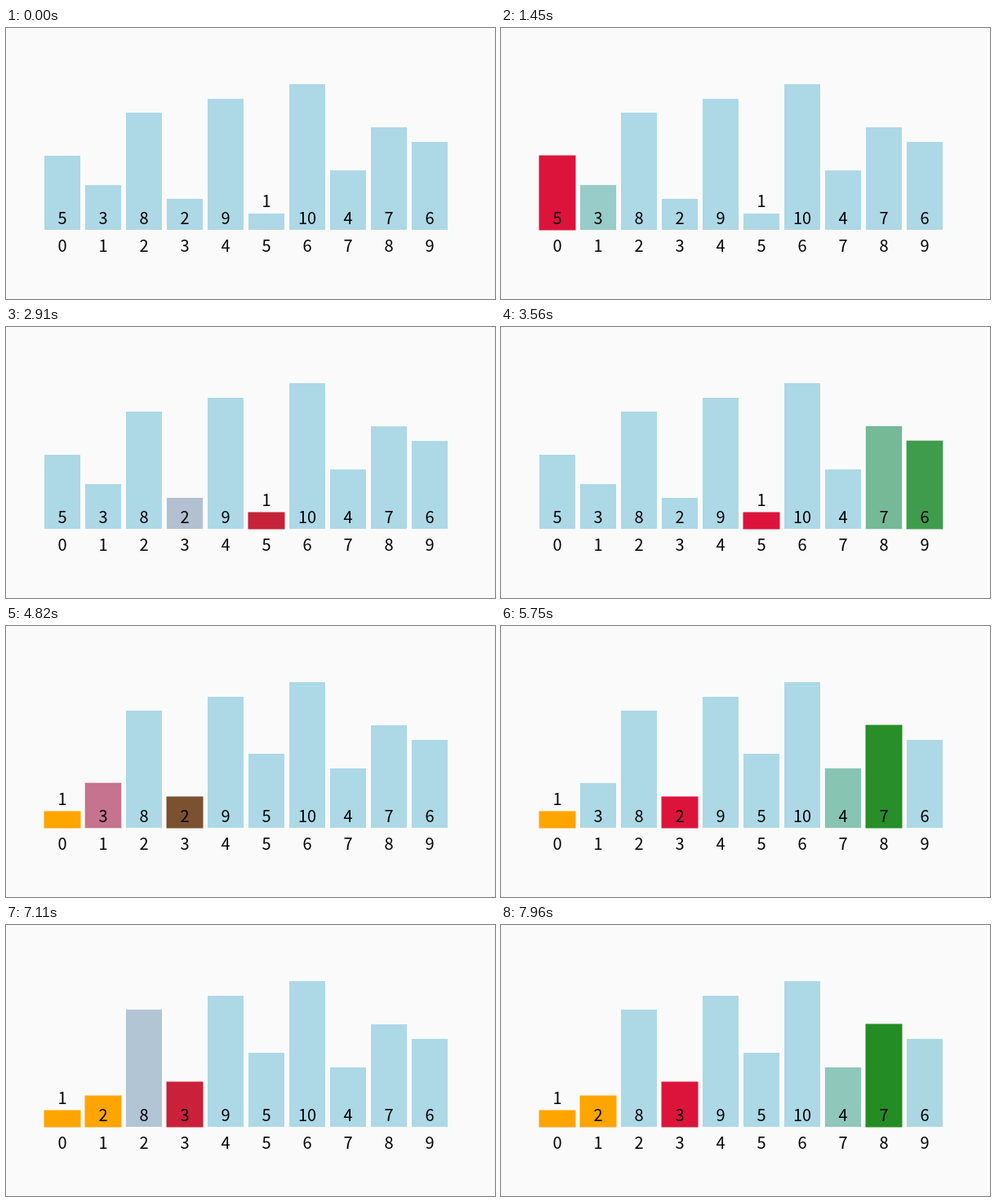
Write an HTML page that moves like this. It is 599 by 333 pixels and loops after 8000 ms.

```html
<!DOCTYPE html>
<html lang="en">
<head>
<meta charset="utf-8">
<title>Selection sort</title>
<style>
  html, body { margin: 0; width: 100%; height: 100%; overflow: hidden; background: #fafafa; }
  svg { display: block; width: 599px; height: 333px; }
  text { font: 20px "Noto Sans CJK SC", "Noto Sans CJK JP", "Noto Sans CJK", "Noto Sans", sans-serif; text-anchor: middle; }
</style>
</head>
<body>
<svg id="stage" viewBox="0 0 599 333"></svg>
<script>
const LOOP = 8000, BASELINE = 248, PITCH = 50;
// Red, green, blue and outline opacity
const IDLE = [173, 216, 230, 0], SCAN = [34, 139, 34, 1],
      LEAST = [220, 20, 60, 1], SORTED = [255, 165, 0, 1];
const RISE = 165, FADE = 216;                    // colour change durations
const STEP = 166, FOUND = 180, SETTLE = 212;     // pauses between steps
const SLIDE = 390;

const stage = document.getElementById("stage");

function add(parent, tag, attributes, content = "") {
  const node = document.createElementNS("http://www.w3.org/2000/svg", tag);
  for (const name in attributes) node.setAttribute(name, attributes[name]);
  node.textContent = content;
  return parent.appendChild(node);
}

function makeBar(value, index) {
  const height = Math.round(17.67 * value + 2.3), top = BASELINE - height;
  const group = add(stage, "g", {});
  const rect = add(group, "rect", { x: 47, y: top, width: 44, height });
  add(group, "text", { x: 69, y: height < 30 ? top - 8 : 241 }, value);
  add(stage, "text", { x: 69 + index * PITCH, y: 275 }, index);
  return { value, index, group, rect, colors: [], moves: [] };
}

const bars = [5, 3, 8, 2, 9, 1, 10, 4, 7, 6].map(makeBar);

function paint(bar, to, start, duration = FADE) {
  bar.colors.push({ to, start, duration });
}

// Records every colour change and swap of the sort on a time line.
function schedule() {
  const order = [...bars];
  let time = 1260;
  for (let i = 0; time < LOOP; i++) {
    let least = i, previous = null;
    paint(order[i], LEAST, time, RISE);
    for (let j = i + 1; j < order.length; j++) {
      time += STEP;
      if (previous) paint(previous, IDLE, time);
      paint(order[j], SCAN, time, RISE);
      previous = order[j];
      if (order[j].value < order[least].value) {
        time += FOUND;
        paint(order[least], IDLE, time);
        paint(order[j], LEAST, time);
        least = j;
        previous = null;
        time += SETTLE - STEP;
      }
    }
    time += STEP;
    if (previous) paint(previous, IDLE, time);
    order[i].moves.push({ to: [least], start: time, duration: SLIDE });
    order[least].moves.push({ to: [i], start: time, duration: SLIDE });
    paint(order[least], SORTED, time + SLIDE + 10);
    [order[i], order[least]] = [order[least], order[i]];
    time += 606 + 40 * i;
  }
}

function valueAt(initial, changes, time) {
  return changes.reduce((from, { to, start, duration }) => {
    const progress = Math.min(1, Math.max(0, (time - start) / duration));
    return from.map((part, k) => part + (to[k] - part) * progress);
  }, initial);
}

function draw(time) {
  for (const bar of bars) {
    const [red, green, blue, outline] = valueAt(IDLE, bar.colors, time);
    const [position] = valueAt([bar.index], bar.moves, time);
    const color = `rgb(${[red, green, blue].map(Math.round)})`;
    bar.group.setAttribute("transform", `translate(${position * PITCH} 0)`);
    bar.rect.setAttribute("fill", color);
    bar.rect.setAttribute("stroke", color);
    bar.rect.setAttribute("stroke-opacity", outline);
  }
}

function tick() {
  draw(performance.now() % LOOP);
  requestAnimationFrame(tick);
}

schedule();
tick();
</script>
</body>
</html>
```
